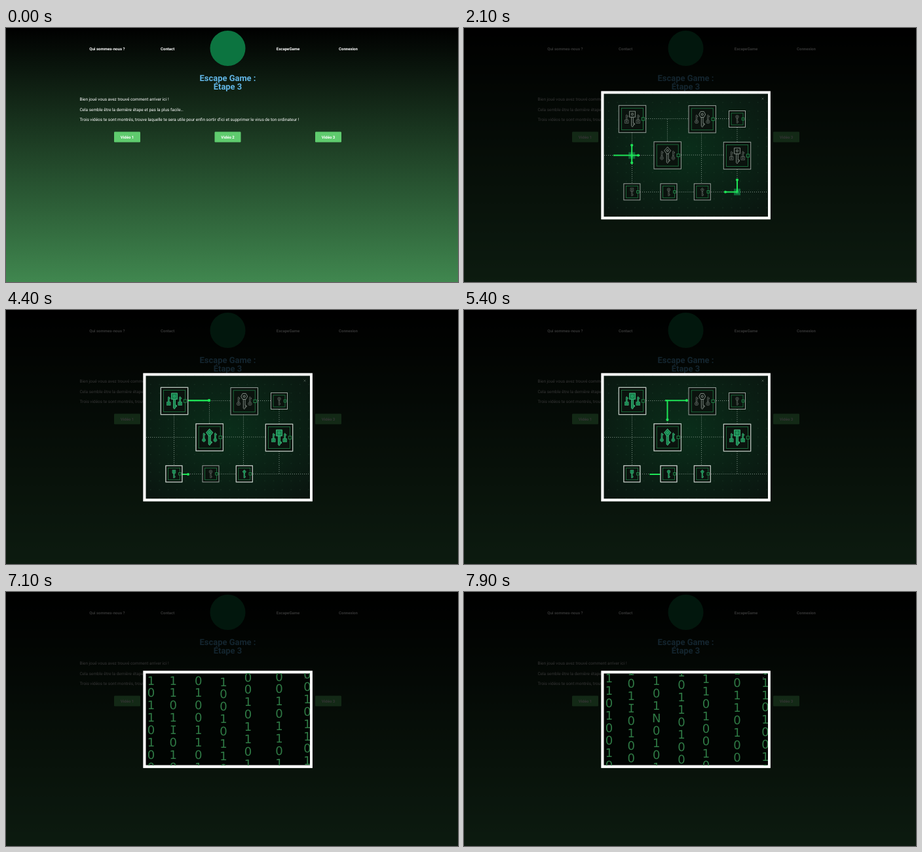
Recreate the animation shown at these times as an HTML page. Size 690 by 388 pixels, loop 8000 ms.

```html
<!DOCTYPE html>
<html lang="fr">
<head>
<meta charset="utf-8">
<title>Escape Game</title>
<style>
  html, body { margin: 0; width: 100%; height: 100%; overflow: hidden; background: #000; }
  svg { display: block; width: 690px; height: 388px; text-rendering: geometricPrecision; }
  text { font-family: Roboto, sans-serif; fill: #fff; }
  .nav { font-size: 6.06px; font-weight: 700; }
  .title { font-size: 12.95px; font-weight: 700; fill: #62b6e6; text-anchor: middle; }
  .body { font-size: 6.46px; }
  .label { font-size: 6.06px; font-weight: 700; text-anchor: middle; }
  .modal { opacity: 0; }
  .wire { fill: none; stroke: #8b9c92; stroke-width: .9; stroke-dasharray: 1 2; }
  .frame { fill: #0b130e; stroke: #98a29c; }
  .inner { fill: none; stroke: #1c7a42; stroke-width: .8; }
  .plug { fill: #0b1f13; stroke: #23944f; stroke-width: .8; }
  .key { fill: #141c17; stroke: #929d96; stroke-width: .8; }
  .lit { opacity: 0; }
  .lit .key { fill: #187d4b; stroke: #2fc27a; }
  .lit .frame { fill: none; stroke: #c3cdc6; }
  .pulse, .head { fill: none; stroke: #1fe457; stroke-width: 2; }
  .head { stroke-width: 4.2; stroke-linecap: round; stroke-dasharray: .01 999; }
  .rain text { font: 18px "DejaVu Sans", sans-serif; fill: #2f7a45; text-anchor: middle; }
  .rain .serif { font-family: "DejaVu Sans Mono", monospace; }
</style>
</head>
<body>
<svg viewBox="0 0 690 388">
  <defs>
    <linearGradient id="sky" x2="0" y2="1">
      <stop stop-color="#000"/><stop offset="1" stop-color="#40874f"/>
    </linearGradient>
    <radialGradient id="board" cx=".5" cy=".45" r=".7">
      <stop stop-color="#0a2e1a"/><stop offset="1" stop-color="#0a1610"/>
    </radialGradient>
    <pattern id="grid" width="13.4" height="13.4" patternUnits="userSpaceOnUse">
      <rect x="6" y="6" width="1" height="1" fill="#2a4d38" opacity=".7"/>
    </pattern>
    <clipPath id="screen"><rect x="213.5" y="124.5" width="250.5" height="140"/></clipPath>
  </defs>

  <rect width="690" height="388" fill="url(#sky)"/>
  <circle cx="338.5" cy="31" r="27" fill="#0c7440"/>
  <g class="nav">
    <text x="127.3" y="34.4">Qui sommes-nous ?</text>
    <text x="236" y="34.4">Contact</text>
    <text x="412.8" y="34.4">EscapeGame</text>
    <text x="508" y="34.4">Connexion</text>
  </g>
  <text class="title" x="338.5" y="81.3">Escape Game :</text>
  <text class="title" x="338.5" y="94.3">Étape 3</text>
  <g class="body">
    <text x="112.4" y="110.9">Bien joué vous avez trouvé comment arriver ici !</text>
    <text x="112.4" y="126.5">Cela semble être la dernière étape et pas la plus facile…</text>
    <text x="112.4" y="142">Trois vidéos te sont montrés, trouve laquelle te sera utile pour enfin sortir d’ici et supprimer le virus de ton ordinateur !</text>
  </g>
  <g id="buttons"></g>

  <g class="modal" id="game">
    <rect width="690" height="388" opacity=".8"/>
    <rect x="209.3" y="96.4" width="258.6" height="196" fill="#fff"/>
    <rect x="213.5" y="100.5" width="250.5" height="187.7" fill="url(#board)"/>
    <rect x="213.5" y="100.5" width="250.5" height="187.7" fill="url(#grid)"/>
    <path class="wire" d="M278 138.5H343M385 138.5H404M310.5 139V173M256.5 160V238M214 194.5H290M332 194H396M362.5 160V238M417 152V174M417 216V250M269 250.5H300M325 250.5H351M377 250.5H464"/>
    <g id="joints">
      <g id="joint1"></g><g id="joint2"></g>
    </g>
    <g id="pulses"></g>
    <g id="nodes"></g>
    <path d="M454.5 106.5l3 3m0-3l-3 3" stroke="#5c6b62" stroke-width=".6"/>
  </g>

  <g class="modal" id="video">
    <rect width="690" height="388" opacity=".8"/>
    <rect x="209.3" y="120.3" width="258.6" height="148.6" fill="#fff"/>
    <rect x="213.5" y="124.5" width="250.5" height="140" fill="#010402"/>
    <g class="rain" id="rain" clip-path="url(#screen)"></g>
    <path d="M455.5 129.5l3 3m0-3l-3 3" stroke="#46514a" stroke-width=".6"/>
  </g>
</svg>

<script>
const LOOP = 8000, STEP = 100;
const $ = id => document.getElementById(id);

function add(parent, markup) {
  const g = document.createElementNS('http://www.w3.org/2000/svg', 'g');
  g.innerHTML = markup;
  return parent.appendChild(g);
}

// keys: [time in ms, properties]; holds before the first and after the last
function play(el, keys, hard) {
  const all = [[0, keys[0][1]], ...keys, [LOOP, keys[keys.length - 1][1]]];
  el.animate(all.map(([t, props], i) => {
    const next = all[i + 1] ? all[i + 1][0] : t;
    const count = hard ? 1 : Math.max(1, Math.round((next - t) / STEP));
    return { ...props, offset: t / LOOP, easing: `steps(${count}, end)` };
  }), { duration: LOOP, iterations: Infinity });
}

const show = (el, from, to) => play(el, [
  [0, { opacity: 0 }], [from, { opacity: 1 }], [to, { opacity: 0 }]
], true);

show($('game'), 2100, 5500);
show($('video'), 7100, LOOP);

[185, 338.5, 492].forEach((x, i) => add($('buttons'),
  `<rect x="${x - 20}" y="158.5" width="40" height="16" rx="1.2" fill="#5fcb6e"/>
   <text class="label" x="${x}" y="168.6">Vidéo ${i + 1}</text>`));

// Circuit nodes
const bows = {
  square: 'M-4.5-4.5h9v9h-9z',
  round: 'M-4.5 0a4.5 4.5 0 1 0 9 0a4.5 4.5 0 1 0-9 0z',
  diamond: 'M0-5.5L5 0L1.3 5h-2.6L-5 0z',
  hex: 'M-2.5-4.5h5l2.5 4.5l-2.5 4.5h-5l-2.5-4.5z',
  drop: 'M0-5C5-4 5 1 1.3 5h-2.6C-5 1-5-4 0-5z'
};

const key = (bow, x, y, sx, sy = sx) =>
  `<g transform="translate(${x} ${y}) scale(${sx} ${sy})">
    <path class="key" d="M-1.4 4.5V18L0 19.5L1.4 18V16h2v-2h-2V4.5z"/>
    <path class="key" d="${bows[bow]}"/><circle class="key" r="1.5"/></g>`;

const box = (cls, x, y, r) =>
  `<rect class="${cls}" x="${x - r}" y="${y - r}" width="${2 * r}" height="${2 * r}"/>`;

function node(x, y, bow, side, litAt) {
  const [outer, inner] = side ? [20.7, 16.5] : [12.5, 9];
  const keys = side
    ? key(bow, x, y - 7.3, 1) + key(side, x - 8.7, y + 4, .62, -.55) + key(side, x + 8.7, y + 4, .62, -.55)
    : key(bow, x, y - 3.4, .52);
  const g = add($('nodes'), box('frame', x, y, outer) + box('inner', x, y, inner) +
    keys + box('plug', x + inner, y, side ? 2.2 : 1.8));
  if (!litAt) return;
  const lit = add(g, box('frame', x, y, outer) + keys);
  lit.setAttribute('class', 'lit');
  show(lit, litAt, 5500);
}

node(257, 139, 'square', 'square', 2700);
node(363.7, 139.3, 'hex', 'round');
node(310.7, 194.5, 'diamond', 'drop', 3300);
node(417, 195, 'square', 'square', 2700);
node(417, 139, 'round');
node(256.4, 250.3, 'square', '', 3200);
node(312.5, 250.3, 'round', '', 5200);
node(363.8, 250.3, 'diamond', '', 3200);

[['joint1', 256.2, 194.7], ['joint2', 417, 250.5]].forEach(([id, x, y]) => {
  $(id).innerHTML = `<g fill="#0f6a38">${box('', x, y, 5)}</g><g fill="#1fa857">${box('', x, y, 2)}</g>`;
});
show($('joints'), 2100, 4000);

// Pulses: path, then [time, tail, head] as distances along it
const pulses = [
  ['M214 194.5H290', [2200, 14, 52], [3000, 48, 70], [3300, 58, 77], [4000, 77, 77]],
  ['M256.2 194.5V160', [2200, 0, 15.5], [2700, 0, 35], [3000, 6.5, 35], [3900, 35, 35]],
  ['M256.2 194.5V238', [2200, 0, 11.5], [3000, 6, 37.5], [3200, 12, 44], [4100, 44, 44]],
  ['M417 250.5V216', [2200, 0, 18.5], [2700, 10, 35], [3000, 20.5, 35], [3500, 35, 35]],
  ['M417 250.5H377', [2200, 0, 18], [3000, 17, 36], [3200, 20, 41], [4000, 41, 41]],
  ['M274 138.2H343', [3200, 0, -3], [4400, 3, 36], [5400, 33, 66]],
  ['M274 138.2H310.5V173', [3200, 0, -3], [4400, 3, 36], [5400, 33, 66]],
  ['M266 251H300', [4000, 0, -3], [4400, 2, 12], [5200, 12, 35], [5500, 20, 35]]
];

pulses.forEach(([d, ...keys]) => {
  const [line, head] = add($('pulses'),
    `<path class="pulse" d="${d}"/><path class="head" d="${d}"/>`).children;
  play(line, keys.map(([t, a, b]) =>
    [t, { strokeDasharray: `0px ${a}px ${Math.max(0, b - a)}px 999px` }]));
  play(head, keys.map(([t, , b]) => [t, { strokeDashoffset: `${-b}px` }]));
});

// Digit columns: x, centre of the first digit, climb in px, digits
const columns = [
  [221.5, 135, 41, '1011010010'],
  [255.3, 135, 33, '1101I0100'],
  [293.7, 135, 94, '01001101N0101'],
  [332, 137, 71, '10010110100'],
  [369.5, 130, 73, '001011010010'],
  [417, 129, 47, '0010110100'],
  [460, 125.5, 63, '001011010010']
];

columns.forEach(([x, y, climb, digits]) => {
  const g = add($('rain'), [...digits].map((c, i) =>
    `<text${c === 'I' ? ' class="serif"' : ''} x="${x}" y="${y + 6.5 + i * 18.9}">${c}</text>`).join(''));
  play(g, [
    [7100, { transform: 'translateY(0px)' }],
    [7900, { transform: `translateY(${-climb}px)` }]
  ]);
});
</script>
</body>
</html>
```
